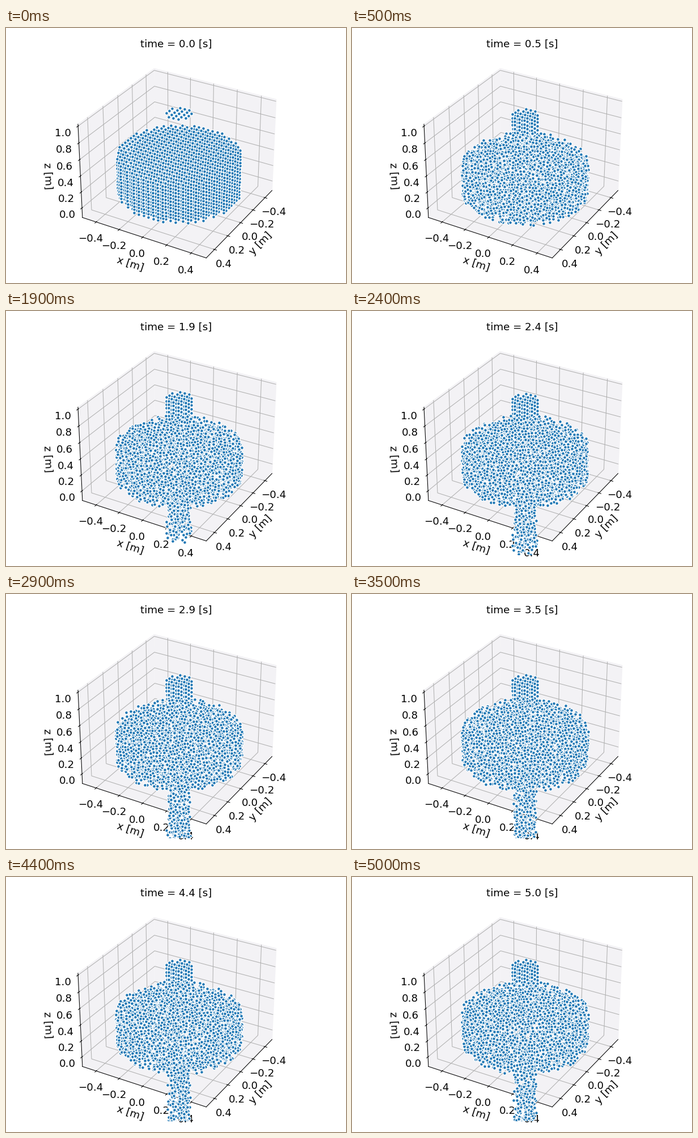
A matplotlib script for the animation above (5100 ms loop, 600 by 450 pixels).

```python
import numpy as np
import matplotlib.pyplot as plt
from matplotlib.animation import FuncAnimation

FRAMES = 51
INTERVAL = 100            # ms
GAP = 0.04                # particle spacing [m]
WALL = 0.465              # tank radius
SURFACE = 0.38            # settled water level
OUT_SPEED = 0.35          # speed of the outflow [m/s]

plt.rcParams.update({"font.family": "DejaVu Sans", "font.size": 14})
rng = np.random.default_rng(4)


def disc(radius):
    """Square grid points inside a circle."""
    i = np.arange(-12, 13) * GAP
    x, y = (a.ravel() for a in np.meshgrid(i, i))
    keep = np.hypot(x, y) <= radius
    return np.column_stack([x[keep], y[keep]])


def layer(xy, z):
    return np.column_stack([xy, np.full(len(xy), z)])


def confine(p):
    """Keep particles inside the tank."""
    r = np.hypot(p[:, 0], p[:, 1])
    p[:, :2] *= np.minimum(1, WALL / np.maximum(r, 1e-6))[:, None]
    p[:, 2] = np.clip(p[:, 2], 0.035, 0.405)
    return p


def relax(p, steps=5, reach=0.036):
    """Push apart particles that are too close."""
    for _ in range(steps):
        sq = (p ** 2).sum(axis=1)
        dist2 = sq[:, None] + sq - 2 * p @ p.T
        dist = np.sqrt(np.maximum(dist2, 1e-6))
        push = 0.45 * np.clip(reach - dist, 0, None) / dist
        np.fill_diagonal(push, 0)
        p = confine(p + p * push.sum(axis=1)[:, None] - push @ p)
    return p


def make_pool():
    """Starting grid and settled places of the visible outer particles."""
    base = disc(0.46)
    rim = base[np.hypot(*base.T) > 0.33]
    start, rest = [], []
    for k in range(12):
        xy = base if k >= 8 else rim
        start.append(layer(xy, 0.06 + GAP * k))
        rest.append(layer(xy * WALL / 0.46, 0.035 + 0.0325 * k))
    rest = np.vstack(rest)
    rest += rng.uniform(-0.02, 0.02, rest.shape)
    return np.vstack(start), relax(confine(rest))


def make_outflow():
    """Layers of the falling stream, measured upwards from its tip."""
    layers = []
    for k in range(56):
        a = rng.uniform(0, 2 * np.pi)
        turn = np.array([[np.cos(a), -np.sin(a)], [np.sin(a), np.cos(a)]])
        width = 1.1 if k < 6 else 0.84
        p = layer(nozzle @ turn * width, 0.038 * k)
        p += rng.uniform(-0.013, 0.013, p.shape)
        share = 0.6 if k < 32 else 0.45
        layers.append(p[rng.random(len(p)) < share])
    return np.vstack(layers)


nozzle = disc(0.1)
pool_start, pool_rest = make_pool()
outflow = make_outflow()
phase = rng.uniform(0, 2 * np.pi, pool_rest.shape)
rate = rng.uniform(1.5, 5, pool_rest.shape)


def pool_at(t):
    e = min(t / 0.25, 1) ** 2
    drift = 0.01 * np.sin(rate * t + phase)
    return pool_start * (1 - e) + confine(pool_rest + drift) * e


def inflow_at(n):
    if n == 0:
        return layer(nozzle, 1.0)
    k = np.arange(16)
    top = 0.985 if n % 2 else 0.965
    heights = top - GAP * k * (1 + 0.025 * k)
    low = max(SURFACE, 1 - 0.1 * n)
    return np.vstack([layer(nozzle, z) for z in heights if z > low - 0.005])


def outflow_at(t):
    p = outflow + [0, 0, -0.11 - OUT_SPEED * t]
    return p[(p[:, 2] < 0) & (p[:, 2] > -1.15) & (t > 0.15)]


# Direction to the camera, weighted by the box proportions
toward = np.array([0.75 * 1.143, 0.433 * 1.143, 0.5 * 0.779])


def far_first(p):
    return p[np.argsort(p @ toward)]


fig = plt.figure(figsize=(6.4, 4.8), dpi=93.75, facecolor="white")
ax = fig.add_axes([0.0328, 0.0437, 0.9344, 0.8643], projection="3d")
ax.view_init(elev=30, azim=30)
dots, = ax.plot([], [], [], "o", color="#1f77b4", ms=4.47, mec="white", mew=1)

side = 0.5 * 25 / 24
ax.set_xlim(-side, side)
ax.set_ylim(-side, side)
ax.set_zlim(-0.1 - 1.1 / 48, 1 + 1.1 / 48)
ticks = [-0.4, -0.2, 0.0, 0.2, 0.4]
ax.set_xticks(ticks)
ax.set_yticks(ticks)
ax.set_zticks([0.0, 0.2, 0.4, 0.6, 0.8, 1.0])
ax.set_xlabel("y [m]")
ax.set_ylabel("x [m]", labelpad=5)
ax.set_zlabel("z [m]")
for axis in (ax.xaxis, ax.yaxis, ax.zaxis):
    axis.set_pane_color("#f3f2f5")
title = ax.set_title("", fontsize=14, y=1.0)
title.set_y(1.0)          # 3D axes lower the title by default


def update(n):
    t = n * INTERVAL / 1000
    water = np.vstack([pool_at(t), outflow_at(t)])
    # The pool hides the lower part of the jet
    p = np.vstack([far_first(inflow_at(n)), far_first(water)])
    dots.set_data_3d(*p.T)
    title.set_text(f"time = {t:.1f} [s]")
    return dots, title


anim = FuncAnimation(fig, update, frames=FRAMES, interval=INTERVAL,
                     init_func=lambda: update(0), repeat=True,
                     repeat_delay=0, blit=False)
plt.show()
```
